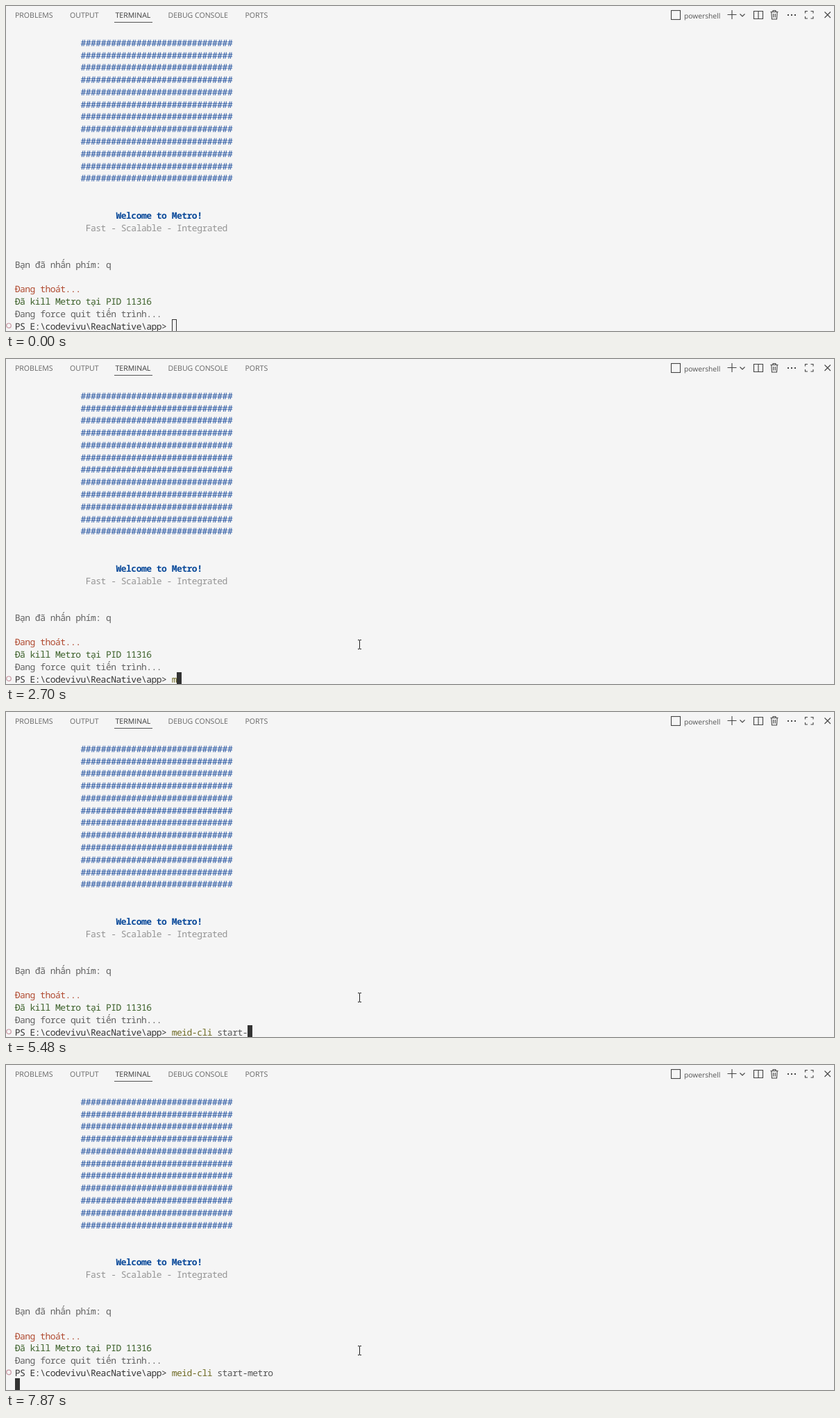
Recreate the animation shown at these times as an HTML page. Size 1193 px wide and 469 px high, loop 8000 ms.

```html
<!DOCTYPE html>
<html lang="vi">
<head>
<meta charset="utf-8">
<title>Terminal</title>
<style>
  html, body { margin: 0; width: 100%; height: 100%; overflow: hidden; background: #f5f5f5; }
  svg { display: block; width: 1193px; height: 469px; }
  text { white-space: pre; text-rendering: geometricPrecision; }
  .tabs text { font: 10.55px "Open Sans", "Noto Sans", sans-serif; fill: #666; }
  .tabs .active { fill: #3b3b3b; }
  .tabs .shell { font-size: 10.25px; fill: #555; }
  .icons { fill: none; stroke: #444; stroke-width: 1.1; }
  .term text { font: 13px "Noto Sans Mono", "DejaVu Sans Mono", monospace; letter-spacing: -.51px; }
  .term .bold { font-weight: 700; }
</style>
</head>
<body>
<svg viewBox="0 0 1193 469">
  <rect width="1193" height="469" fill="#f5f5f5"/>
  <g class="tabs">
    <text x="13" y="17">PROBLEMS</text>
    <text x="92" y="17">OUTPUT</text>
    <text x="157.5" y="17" class="active">TERMINAL</text>
    <text x="233.5" y="17">DEBUG CONSOLE</text>
    <text x="344.5" y="17">PORTS</text>
    <text x="977" y="17.5" class="shell">powershell</text>
    <rect x="156" y="23" width="55" height="1" fill="#555"/>
  </g>
  <g class="icons">
    <rect x="958.5" y="6.5" width="13" height="13"/>
    <path d="M1039.5 12.5h13M1046 6v13"/>
    <path d="M1057.5 11.5l3.5 3.5 3.5-3.5"/>
    <path d="M1077.5 7.5h13v11h-13zM1084 7.5v11"/>
    <path d="M1101.5 8.5h11M1105 8.5v-2h4v2M1102.8 8.5l.7 10.5h7l.7-10.5M1105.7 11v5.5M1108.3 11v5.5"/>
    <path d="M1126 13h2M1131 13h2M1136 13h2" stroke-width="2"/>
    <path d="M1151.5 10.5v-3h3.5M1159.5 7.5h3.5v3M1163 15v3h-3.5M1155 18h-3.5v-3"/>
    <path d="M1179.5 8.5l8.5 8.5M1188 8.5l-8.5 8.5"/>
  </g>
  <g class="term">
    <g id="lines"></g>
    <rect id="caret"/>
  </g>
  <circle id="click" cx="508" cy="411.5" r="12" fill="#ff0" fill-opacity=".47"/>
  <path id="mouse" d="M-2.5-6.5h2l.5.5.5-.5h2M0-6v12M-2.5 6.5h2l.5-.5.5.5h2" fill="none" stroke="#222"/>
</svg>
<script>
const LOOP = 8000, LEFT = 13, COL = 7.29, ROW = 17.78, BASE = 57.8;
const PROMPT_ROW = 23, INPUT_COL = 31;
const COMMAND = 'meid-cli', INPUT = 'meid-cli start-metro';
const FOCUS = 960, ENTER = 7870;

// When each character of INPUT appears, and when the caret blinks off for a redraw.
const KEYS = [2700, 2830, 2960, 3090, 3490, 3620, 3750, 3950, 4160, 4430,
  4490, 4630, 4690, 4820, 5480, 6280, 6610, 6740, 6810, 6940];
const REDRAWS = [2630, 2890, 3690, 4360, 6210];

const $ = id => document.getElementById(id);
const lines = $('lines'), caret = $('caret'), mouse = $('mouse'), click = $('click');

function make(tag, attrs, parent, content = '') {
  const el = document.createElementNS('http://www.w3.org/2000/svg', tag);
  set(el, attrs);
  el.textContent = content;
  return parent.appendChild(el);
}
function set(el, attrs) {
  for (const key in attrs) el.setAttribute(key, attrs[key]);
}
function show(el, on) {
  el.style.display = on ? '' : 'none';
}
function line(row, col, fill, content, cls = '') {
  return make('text', { x: LEFT - 0.3 + col * COL, y: BASE + row * ROW, fill, class: cls }, lines, content);
}

const banner = Array.from({ length: 12 }, (_, row) => line(row, 13, '#1f4f9e', '#'.repeat(30)));
line(14, 20, '#0b4a9a', 'Welcome to Metro!', 'bold');
line(15, 14, '#949494', 'Fast - Scalable - Integrated');
line(18, 0, '#616161', 'Bạn đã nhấn phím: q');
line(20, 0, '#b04a30', 'Đang thoát...');
line(21, 0, '#3a5f28', 'Đã kill Metro tại PID 11316');
line(22, 0, '#616161', 'Đang force quit tiến trình...');
line(PROMPT_ROW, 0, '#333', 'PS E:\\codevivu\\ReacNative\\app> ');
const command = line(PROMPT_ROW, INPUT_COL, '#6e6a24', '');
const args = line(PROMPT_ROW, INPUT_COL + COMMAND.length, '#555', '');
make('circle', { cx: 4, cy: 461.3, r: 3.3, fill: 'none', stroke: '#c795a0', 'stroke-width': 1.2 }, lines);

function drawCaret(t, typed, entered) {
  const focused = t >= FOCUS;
  const inset = focused ? 0 : 0.5;
  const col = entered ? 0 : INPUT_COL + typed;
  set(caret, {
    x: Math.round(LEFT + col * COL) + inset, y: 452 + inset,
    width: 7 - 2 * inset, height: 18,
    fill: focused ? '#333' : 'none', stroke: focused ? 'none' : '#333'
  });
  const lastKey = typed ? KEYS[typed - 1] : 0;
  show(caret, entered || !REDRAWS.some(r => t >= r && r > lastKey));
}

function drawMouse(t) {
  const step = Math.floor((Math.min(t, 910) - 130) / 70.9 + 0.01);
  const p = Math.max(0, step) / 11;
  const k = p * p * (3 - 2 * p);
  const x = 921 + (509.5 - 921) * k;
  const y = 448 * (1 - k) ** 2 + 2 * 370 * k * (1 - k) + 412 * k * k;
  set(mouse, { transform: `translate(${Math.round(x * 2) / 2} ${Math.round(y)})` });
  show(mouse, t >= 130);
  show(click, t >= FOCUS && t < 1110);
}

function render(t) {
  const typed = KEYS.filter(k => t >= k).length;
  const entered = t >= ENTER;
  command.textContent = INPUT.slice(0, Math.min(typed, COMMAND.length));
  args.textContent = INPUT.slice(COMMAND.length, Math.max(typed, COMMAND.length));
  set(lines, { transform: `translate(0 ${entered ? -ROW : 0})` });
  show(banner[0], !entered);
  drawCaret(t, typed, entered);
  drawMouse(t);
}

const start = performance.now();
function tick() {
  render((performance.now() - start) % LOOP);
  requestAnimationFrame(tick);
}
render(0);
requestAnimationFrame(tick);
</script>
</body>
</html>
```
